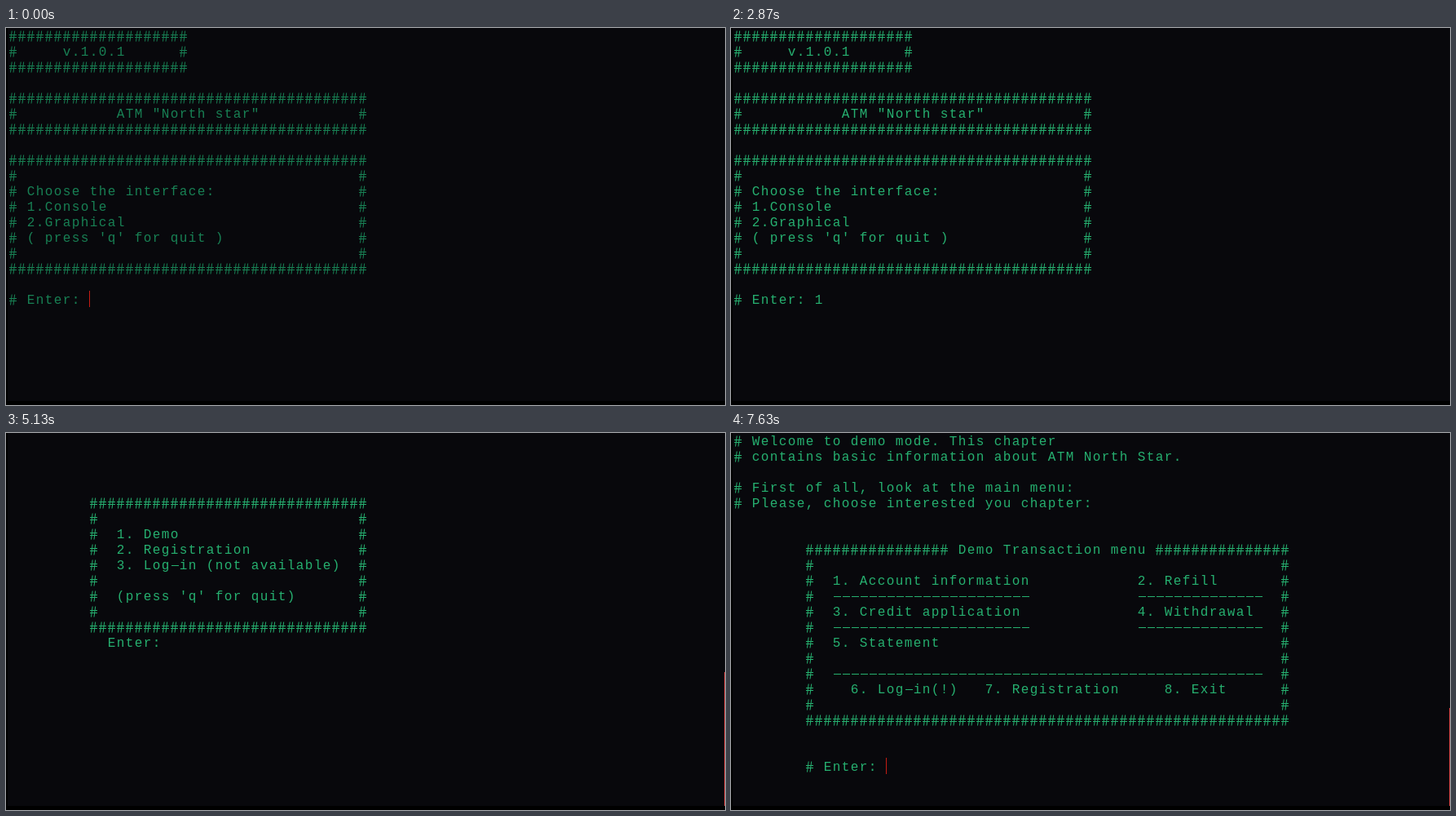
Animation of 882x462 px, one loop 8000 ms. Source, as an HTML page with a canvas:

```html
<!DOCTYPE html>
<html lang="en">
<head>
<meta charset="utf-8">
<title>ATM console</title>
<style>
html, body { margin: 0; width: 100%; height: 100%; overflow: hidden; background: #000; }
canvas { display: block; }
</style>
</head>
<body>
<canvas id="stage" width="882" height="462"></canvas>
<script>
const ctx = document.getElementById('stage').getContext('2d');
const LOOP = 8000, CELL = 11, ROW = 19, LEFT = 3, BASE = 15;
const SIZE = 16, GAP = CELL - SIZE * 0.6;

const hash = n => '#'.repeat(n);
const dash = n => '-'.repeat(n);
const at = (col, s) => ' '.repeat(col) + s;
const framed = (width, s = '') => '#' + s.padEnd(width - 2) + '#';

const start = [
  hash(20), framed(20, at(5, 'v.1.0.1')), hash(20), '',
  hash(40), framed(40, at(11, 'ATM "North star"')), hash(40), '',
  hash(40),
  ...['', ' Choose the interface:', ' 1.Console', ' 2.Graphical',
    " ( press 'q' for quit )", ''].map(s => framed(40, s)),
  hash(40), '', '# Enter:'
];

const banner = [
  '  ##   ## ####### ######  ######## ##  ##',
  '  ###  ## ##   ## ##   ##    ##    ##  ##',
  '  ## # ## ##   ## ######     ##    ######',
  '  ##  ### ##   ## ##  ##     ##    ##  ##',
  '  ##   ## ####### ##   ##    ##    ##  ##',
  '',
  '     ######  ########    #####  ######',
  '     ##         ##      ##  ##  ##   ##',
  '     ######     ##     ##   ##  ######',
  '         ##     ##    ########  ##  ##',
  '     ######     ##    ##    ##  ##   ##',
  '',
  '        ######  ########  ###     ###',
  '       ##   ##     ##     ####   ####',
  '      ##    ##     ##     ## ## ## ##',
  '     ## ### ##     ##     ##  ###  ##',
  '     ##     ##     ##     ##   #   ##'
];
const splash = [
  dash(45), ...banner.map(s => '-' + s.padEnd(43) + '-'), dash(45),
  at(17, 'ATM #0001'),
  at(6, '47 Alders Rd, Elm Dorn, ZQ 40719'),
  at(14, 'press "Enter"')
];

const menu = [
  hash(31),
  ...['', '  1. Demo', '  2. Registration', '  3. Log-in (not available)', '',
    "  (press 'q' for quit)", ''].map(s => framed(31, s)),
  hash(31), '  Enter:'
].map(s => at(9, s));

const intro = [
  '# Welcome to demo mode. This chapter',
  '# contains basic information about ATM North Star.', '',
  '# First of all, look at the main menu:',
  '# Please, choose interested you chapter:'
];
const pair = (a, b) => '  ' + a.padEnd(34) + b;
const rule = pair(dash(22), dash(14));
const demo = [
  hash(16) + ' Demo Transaction menu ' + hash(15),
  ...['', pair('1. Account information', '2. Refill'), rule,
    pair('3. Credit application', '4. Withdrawal'), rule,
    '  5. Statement', '', '  ' + dash(48),
    '    6. Log-in(!)   7. Registration     8. Exit', ''].map(s => framed(54, s)),
  hash(54), '', '', '# Enter:'
].map(s => at(8, s));

// [from, to, column, row]
const carets = [
  [0, 1230, 9, 17], [1830, 2300, 9, 17], [2330, 2870, 10, 17],
  [4100, 4530, 0, 22], [4770, 5130, 18, 13], [5600, 6170, 19, 13],
  [7630, LOOP, 17, 21]
];

// A narrow hash: two slanted stems and two bars.
function hashPath(x, y) {
  for (const dx of [2.5, 6]) {
    ctx.moveTo(x + dx, y + 16.5);
    ctx.lineTo(x + dx + 1.7, y + 3.5);
  }
  for (const dy of [8.5, 11.5]) {
    ctx.moveTo(x + 1, y + dy);
    ctx.lineTo(x + 10, y + dy);
  }
}

function text(s, col, row) {
  const x = LEFT + col * CELL, y = row * ROW;
  ctx.fillText(s.replace(/[-#]/g, ' '), x + GAP / 2, y + BASE);
  ctx.beginPath();
  for (let i = 0; i < s.length; i++) {
    const cx = x + i * CELL;
    if (s[i] === '-') ctx.fillRect(cx + 2, y + 10, 9, 1);
    if (s[i] === '#') hashPath(cx, y);
  }
  ctx.stroke();
}

function lines(list, row, count = list.length) {
  list.slice(0, count).forEach((s, i) => text(s, 0, row + i));
}

// Rows appear one after another between two times.
function printed(list, row, t, from, to) {
  const p = Math.min(1, Math.max(0, (t - from) / (to - from)));
  lines(list, row, Math.floor(p * list.length + 1e-6));
}

function typed(list, row, chars) {
  list.forEach((s, i) => {
    if (chars > 0) text(s.slice(0, chars), 0, row + i);
    chars -= s.length;
  });
}

function thumb(top) {
  ctx.fillStyle = '#c83c3c';
  ctx.fillRect(881, top, 1, 457 - top);
}

function pointer(x, y) {
  ctx.fillStyle = '#e8e8e8';
  ctx.fillRect(x, y - 6, 1, 13);
  for (const dy of [-7, 6]) {
    ctx.fillRect(x - 2, y + dy, 2, 1);
    ctx.fillRect(x + 1, y + dy, 2, 1);
  }
}

function draw(t) {
  const fade = Math.min(1, t / 700);
  const mix = (a, b) => Math.round(a + (b - a) * fade);
  ctx.fillStyle = '#000';
  ctx.fillRect(0, 0, 882, 462);
  ctx.fillStyle = '#08080c';
  ctx.fillRect(2, 0, 880, 457);

  ctx.font = `${SIZE}px "Liberation Mono", "Courier New", monospace`;
  ctx.letterSpacing = GAP + 'px';
  ctx.lineWidth = 1;
  ctx.fillStyle = ctx.strokeStyle = `rgb(${mix(24, 38)},${mix(128, 176)},${mix(84, 112)})`;
  if (t < 2900) {
    lines(start, 0);
    if (t >= 2300) text('1', 9, 17);
    if (t >= 660 && t < 830) pointer(747, 412);
  } else if (t < 4530) {
    printed(splash, 0, t, 2880, 3500);
    thumb(202);
  } else if (t < 6430) {
    printed(menu, 4, t, 4500, 4770);
    if (t >= 5600) text('1', 18, 13);
    thumb(293);
  } else {
    typed(intro, 0, Math.floor((t - 6430) / 5.05));
    printed(demo, 7, t, 7245, 7630);
    thumb(337);
  }

  ctx.fillStyle = '#c41c14';
  for (const [from, to, col, row] of carets)
    if (t >= from && t < to) ctx.fillRect(LEFT + col * CELL, row * ROW - 1, 1, 20);
}

function tick() {
  draw(performance.now() % LOOP);
  requestAnimationFrame(tick);
}
tick();
</script>
</body>
</html>
```
